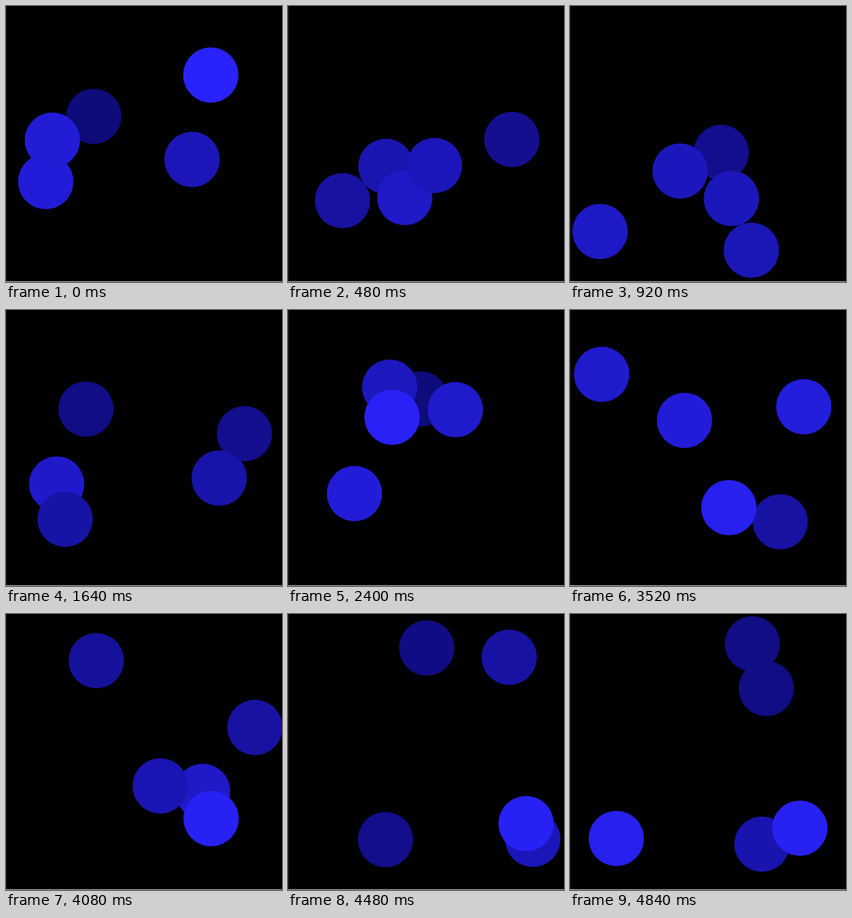
Recreate the animation shown at these times as an HTML page with a canvas. Size 500x500 px, loop 4880 ms.

```html
<!DOCTYPE html>
<html lang="en">
<head>
<meta charset="utf-8">
<title>Bouncing balls</title>
<style>
  html, body { margin: 0; height: 100%; overflow: hidden; background: #000; }
  canvas { display: block; width: 500px; height: 500px; }
</style>
</head>
<body>
<canvas id="stage" width="500" height="500"></canvas>
<script>
const SIZE = 500, RADIUS = 50, LOOP = 4880, TICK = 40;
const ctx = document.getElementById('stage').getContext('2d');

// Listed back to front. Distances are in pixels, times in ticks.
const axis = (start, speed, overshoot) => ({ start, speed, overshoot });
const pulse = (mid, swing, period, peak) => ({ mid, swing, period, peak });
const balls = [
  { x: axis(159, -5.02, 1), y: axis(200, 12.72, 0.5), glow: pulse(180, 58, 10, 5) },
  { x: axis(72, 8.78, 1), y: axis(318, -2.29, 2.5), glow: pulse(180, 50, 84, 74) },
  { x: axis(84, 10.63, 3), y: axis(243, 8.67, 1.5), glow: pulse(193, 24, 90, 84) },
  { x: axis(337, -5.98, 0.7), y: axis(278, 0.909, 0), glow: pulse(215, 30, 210, 110) },
  { x: axis(371, 10.29, 0), y: axis(125, 9.73, 1.5), glow: pulse(190, 62, 31.1, 0) }
];

// Constant speed, turning back slightly past each wall
function bounce({ start, speed, overshoot }, tick) {
  const low = RADIUS - overshoot, span = SIZE - 2 * low, period = 2 * span;
  const travelled = (((start + speed * tick - low) % period) + period) % period;
  return low + Math.min(travelled, period - travelled);
}

function blue({ mid, swing, period, peak }, tick) {
  const level = mid + swing * Math.cos(2 * Math.PI * (tick - peak) / period);
  const lift = level - 122;
  return `rgb(${Math.round(14 + lift * 0.215)}, ${Math.round(11 + lift * 0.18)}, ${Math.round(level)})`;
}

function draw(time) {
  const tick = Math.floor((time % LOOP) / TICK);
  ctx.fillStyle = '#000';
  ctx.fillRect(0, 0, SIZE, SIZE);
  for (const { x, y, glow } of balls) {
    ctx.fillStyle = blue(glow, tick);
    ctx.beginPath();
    ctx.arc(bounce(x, tick), bounce(y, tick), RADIUS, 0, 2 * Math.PI);
    ctx.fill();
  }
  // Thin rim on the left and bottom edges
  ctx.fillStyle = '#2a2a2a';
  ctx.fillRect(0, 0, 1, SIZE);
  ctx.fillStyle = '#eee';
  ctx.fillRect(0, SIZE - 1, SIZE, 1);
}

const begin = performance.now();
function loop() {
  draw(performance.now() - begin);
  requestAnimationFrame(loop);
}
loop();
</script>
</body>
</html>
```
